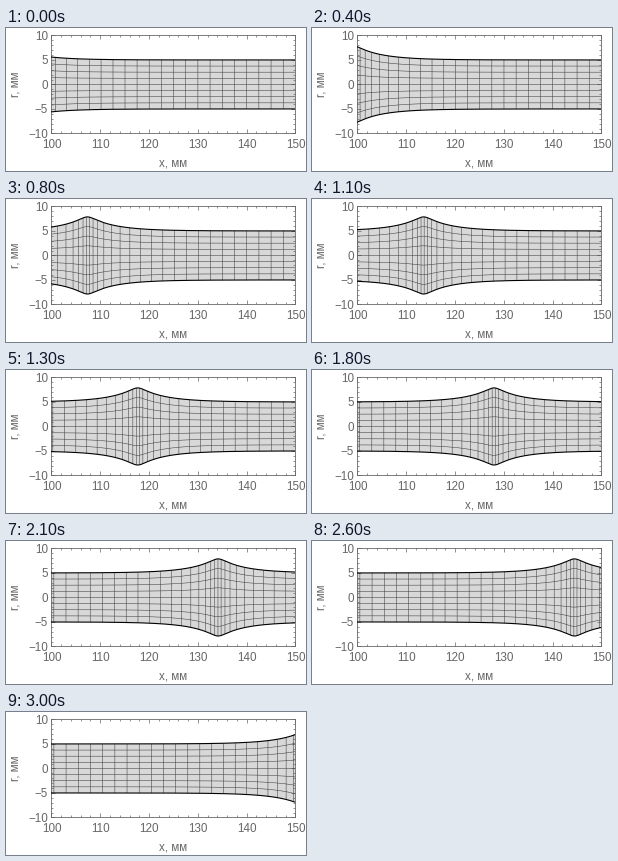
A matplotlib script for the animation above (3100 ms loop, 300 by 143 pixels).

```python
import numpy as np
import matplotlib.pyplot as plt
from matplotlib.animation import FuncAnimation
from matplotlib.collections import LineCollection
from matplotlib.ticker import MultipleLocator

W, H, DPI = 300, 143, 100
FRAMES, INTERVAL = 31, 100
PX = 72 / DPI
GRAY = "#666666"
plt.rcParams["font.family"] = "Liberation Sans"

# Compression soliton in a rod, described in material coordinates.
R0, BULGE = 5.0, 2.87
STRAIN, WIDTH = 0.75, 12.0
START, SPEED = 81.9, 2.06
STEP = 2.5

material = np.linspace(40, 220, 1441)
marks = np.arange(40, 200, STEP)


def deform(s, centre):
    """Axial position and radius of the material sections s."""
    wave = np.tanh((s - centre) / WIDTH)
    return s + STRAIN * WIDTH * (1 - wave), R0 + BULGE * (1 - wave ** 2)


fig = plt.figure(figsize=(W / DPI, H / DPI), dpi=DPI, facecolor="white")
left, right, top, bottom = 45.45, 289.45, 7.45, 105.45
ax = fig.add_axes([left / W, 1 - bottom / H, (right - left) / W, (bottom - top) / H])
ax.set(xlim=(100, 150), ylim=(-10, 10))
ax.xaxis.set_major_locator(MultipleLocator(10))
ax.xaxis.set_minor_locator(MultipleLocator(2))
ax.yaxis.set_major_locator(MultipleLocator(5))
ax.yaxis.set_minor_locator(MultipleLocator(1))
ax.tick_params(which="both", direction="in", top=True, right=True,
               color=GRAY, width=0.5, labelcolor=GRAY, labelsize=11.6 * PX)
ax.tick_params(which="major", length=4 * PX)
ax.tick_params(which="minor", length=2.4 * PX)
ax.tick_params(axis="x", pad=5.5 * PX)
ax.tick_params(axis="y", pad=3.5 * PX)
for spine in ax.spines.values():
    spine.set(color=GRAY, linewidth=0.6)

label = dict(color=GRAY, fontsize=11.6 * PX, ha="center", va="center")
fig.text(167 / W, 1 - 135 / H, "x, мм", **label)
fig.text(9.5 / W, 1 - 56 / H, "r, мм", rotation=90, **label)

body = ax.fill_between(material, -R0, R0, color="#d8d8d8", linewidth=0)
mesh = LineCollection([], colors="#404040", linewidths=0.38, zorder=2, snap=False)
ax.add_collection(mesh)
walls = [ax.plot([], [], color="black", lw=0.8, zorder=3)[0] for _ in range(2)]


def draw(i):
    centre = START + SPEED * i
    x, r = deform(material, centre)
    body.set_verts([np.column_stack([np.r_[x, x[::-1]], np.r_[r, -r[::-1]]])])
    for wall, sign in zip(walls, (1, -1)):
        wall.set_data(x, sign * r)
    rows = [np.column_stack([x, k / 4 * r]) for k in range(-3, 4)]
    cols = [[(mx, -mr), (mx, mr)] for mx, mr in zip(*deform(marks, centre))]
    mesh.set_segments(rows + cols)
    return [body, mesh, *walls]


anim = FuncAnimation(fig, draw, frames=FRAMES, interval=INTERVAL,
                     repeat=True, repeat_delay=0)
plt.show()
```
